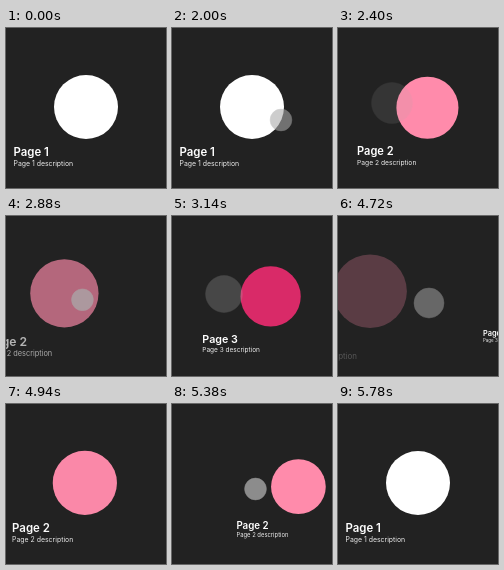
An HTML page that plays this animation: 160 by 160 pixels, repeating every 6780 ms.

```html
<!DOCTYPE html>
<html lang="en">
<head>
<meta charset="utf-8">
<title>Page carousel</title>
<style>
  html, body { margin: 0; width: 100%; height: 100%; overflow: hidden; background: #222; }
  svg { display: block; width: 100%; height: 100%; }
  text { font-family: Inter, "Open Sans", sans-serif; fill: #fff; }
  .title { font-size: 11.4px; font-weight: 600; }
  .desc { font-size: 6.9px; fill: #eee; }
</style>
</head>
<body>
<svg id="stage" viewBox="0 0 160 160"></svg>
<script>
const NS = 'http://www.w3.org/2000/svg';
const LOOP = 6780;
const RELEASE = 120;  // ms from touch down to lift
const FADE = 340;     // ms for the touch mark to vanish
const DRAGGED = 0.29; // share of a page covered by the finger
const COLORS = ['#fff', '#ff8bab', '#d92a68'];

// Each swipe: start, length, page before and after, settle power, finger path
const SWIPES = [
  { at: 2000, len: 560, from: 0, to: 1, pow: 2.46, a: [109, 92], b: [54, 75] },
  { at: 2800, len: 600, from: 1, to: 2, pow: 2.95, a: [107, 91], b: [52, 78] },
  { at: 4480, len: 520, from: 2, to: 1, pow: 2.42, a: [37, 86], b: [91, 87] },
  { at: 5260, len: 520, from: 1, to: 0, pow: 2.42, a: [30, 86], b: [83.5, 85] }
];

const stage = document.getElementById('stage');
const clamp = (v, lo = 0, hi = 1) => Math.min(hi, Math.max(lo, v));
const mix = (a, b, k) => a + (b - a) * k;

function add(parent, tag, attrs, text) {
  const el = document.createElementNS(NS, tag);
  set(el, attrs);
  if (text) el.textContent = text;
  return parent.appendChild(el);
}

function set(el, attrs) {
  for (const key in attrs) el.setAttribute(key, attrs[key]);
}

add(stage, 'rect', { width: 160, height: 160, fill: '#222' });

const pages = COLORS.map((fill, i) => {
  const g = add(stage, 'g', {});
  add(g, 'circle', { cx: 80, cy: 79, r: 32, fill });
  add(g, 'text', { x: 7.5, y: 128, class: 'title' }, `Page ${i + 1}`);
  add(g, 'text', { x: 7.5, y: 138, class: 'desc' }, `Page ${i + 1} description`);
  return g;
});

const touch = add(stage, 'circle', { fill: '#aaa', stroke: '#aaa', 'stroke-width': 0.5 });

const dragged = t => clamp((t - 30) / (RELEASE - 30));

function progress(swipe, t) {
  if (t <= RELEASE) return DRAGGED * dragged(t) ** 1.3;
  const left = 1 - clamp((t - RELEASE) / (swipe.len - RELEASE));
  return 1 - (1 - DRAGGED) * left ** swipe.pow;
}

function drawPage(el, p) {
  const alpha = clamp(1 + 2.5 * p);
  const shown = alpha > 0 && p < 1;
  set(el, {
    visibility: shown ? 'visible' : 'hidden',
    opacity: alpha,
    transform: `translate(${80 + 160 * p} 104) scale(${1 - 0.5 * p}) translate(-80 -104)`
  });
}

function drawTouch(swipe, t) {
  const fade = clamp((t - RELEASE) / FADE);
  const alpha = swipe ? mix(0.58, 0.78, clamp(t / 100)) * (1 - fade) : 0;
  touch.setAttribute('opacity', alpha);
  if (!swipe) return;
  const k = dragged(t);
  set(touch, {
    cx: mix(swipe.a[0], swipe.b[0], k),
    cy: mix(swipe.a[1], swipe.b[1], k),
    r: mix(10.9, 22.5, fade)
  });
}

function render(time) {
  const swipe = SWIPES.filter(s => s.at <= time).pop();
  const t = swipe ? time - swipe.at : 0;
  const pos = swipe ? mix(swipe.from, swipe.to, progress(swipe, t)) : 0;
  pages.forEach((el, i) => drawPage(el, i - pos));
  drawTouch(swipe, t);
}

let start;
function tick(now) {
  start ??= now;
  render((now - start) % LOOP);
  requestAnimationFrame(tick);
}
render(0);
requestAnimationFrame(tick);
</script>
</body>
</html>
```
